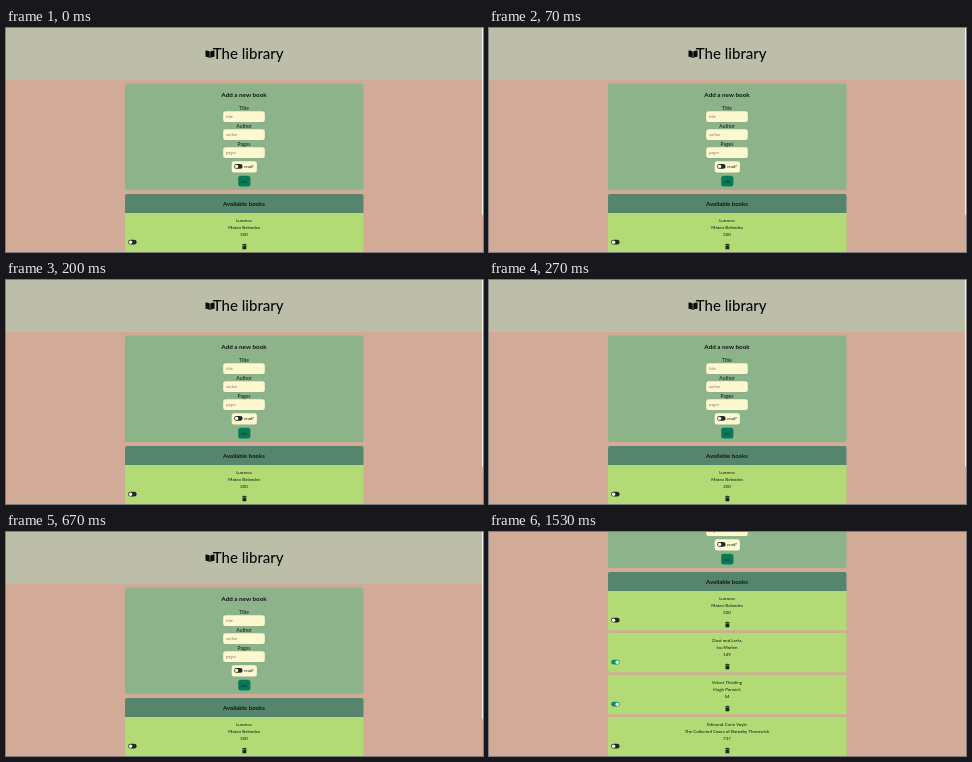
Recreate the animation shown at these times as an HTML page with a canvas. Size 477 by 224 pixels, loop 3.07 s.

```html
<!DOCTYPE html>
<html lang="en">
<head>
<meta charset="utf-8">
<title>The library</title>
<style>
html, body { margin: 0; width: 100%; height: 100%; overflow: hidden; background: #d2ab98; }
canvas { display: block; width: 477px; height: 224px; }
</style>
</head>
<body>
<canvas id="stage" width="477" height="224"></canvas>
<script>
const ctx = document.getElementById('stage').getContext('2d');
const LOOP = 3070, SCROLL_AT = 1530, SCROLL_Y = 126;
const MID = 238, INK = '#10180f', CREAM = '#fef8d0', GREEN = '#087a56';

const books = [
  { lines: ['Lunarco', 'Mateo Belandra', '300'], read: false },
  { lines: ['Dust and Larks', 'Ivo Marlen', '149'], read: true },
  { lines: ['Velvet Thistling', 'Hugh Parwick', '54'], read: true },
  { lines: ['Edmund Corin Vayle', 'The Collected Cases of Barnaby Thornwick', '737'], read: false }
];

function box(x, y, w, h, color, radius = 0) {
  ctx.fillStyle = color;
  ctx.beginPath();
  ctx.roundRect(x, y, w, h, radius);
  ctx.fill();
}

function text(str, x, y, size, weight = 400, color = INK, align = 'center') {
  ctx.font = `${weight} ${size}px Lato, "Open Sans", sans-serif`;
  ctx.textAlign = align;
  ctx.textBaseline = 'alphabetic';
  ctx.fillStyle = color;
  ctx.fillText(str, x, y);
}

function toggle(x, y, on) {
  box(x, y, 8.4, 4.8, on ? '#078f70' : '#202a24', 2.4);
  ctx.fillStyle = '#fffdf0';
  ctx.beginPath();
  ctx.arc(x + (on ? 6 : 2.4), y + 2.4, 1.7, 0, Math.PI * 2);
  ctx.fill();
}

function page(x, dir) {
  ctx.beginPath();
  ctx.moveTo(x, 23.6);
  ctx.quadraticCurveTo(x + dir * 2, 22.3, x + dir * 4.2, 22.5);
  ctx.lineTo(x + dir * 4.2, 28.8);
  ctx.quadraticCurveTo(x + dir * 2, 28.8, x, 30);
  ctx.fill();
}

function trash(y) {
  box(236.2, y, 4.4, 0.9, INK);
  box(237.6, y - 0.5, 1.6, 0.7, INK);
  box(236.5, y + 1.2, 3.8, 3.8, INK, 0.6);
  box(237.6, y + 2, 0.35, 2.2, '#638044');
  box(238.9, y + 2, 0.35, 2.2, '#638044');
}

function header() {
  box(0, 0, 477, 52, '#bcbea9');
  ctx.fillStyle = '#080b08';
  page(203.7, -1);
  page(204.3, 1);
  text('The library', 242.2, 31.2, 15, 500, '#080b08');
}

function form() {
  box(119, 55.5, 238.5, 106.5, '#8db38b', 2);
  text('Add a new book', MID, 69, 6.3, 700);
  ['Title', 'Author', 'Pages'].forEach((label, i) => {
    const y = 83.3 + i * 18;
    text(label, MID, y - 1.6, 5);
    box(217.2, y, 41.6, 10.8, CREAM, 2.5);
    text(label.toLowerCase(), 220, y + 7, 4, 400, '#85836f', 'left');
  });
  box(225.7, 133.2, 25.2, 11.2, CREAM, 2.5);
  toggle(228.2, 136, false);
  text('read?', 243, 140.4, 4.1);
  box(232.2, 147.8, 12.2, 10.7, GREEN, 2.5);
  text('add', MID, 154.6, 4, 400, '#063d2b');
}

function list() {
  box(119, 166, 238.5, 19, '#55856c', [2, 2, 0, 0]);
  text('Available books', MID, 178.2, 6, 700);
  books.forEach((book, i) => {
    const y = 185 + i * 42;
    box(119, y, 238.5, 39.4, '#b2da75', i ? 2 : [0, 0, 2, 2]);
    book.lines.forEach((line, n) => text(line, MID, y + 8.8 + n * 7.2, 4.5));
    toggle(122.2, y + 26.8, book.read);
    trash(y + 31.3);
  });
}

function draw(now) {
  const scrolled = now % LOOP >= SCROLL_AT;
  box(0, 0, 477, 224, '#d2ab98');
  ctx.save();
  if (scrolled) ctx.translate(0, -SCROLL_Y);
  header();
  form();
  list();
  ctx.restore();
  if (!scrolled) box(476, 0, 1, 187, '#f7f4ef');
  requestAnimationFrame(draw);
}
requestAnimationFrame(draw);
</script>
</body>
</html>
```
